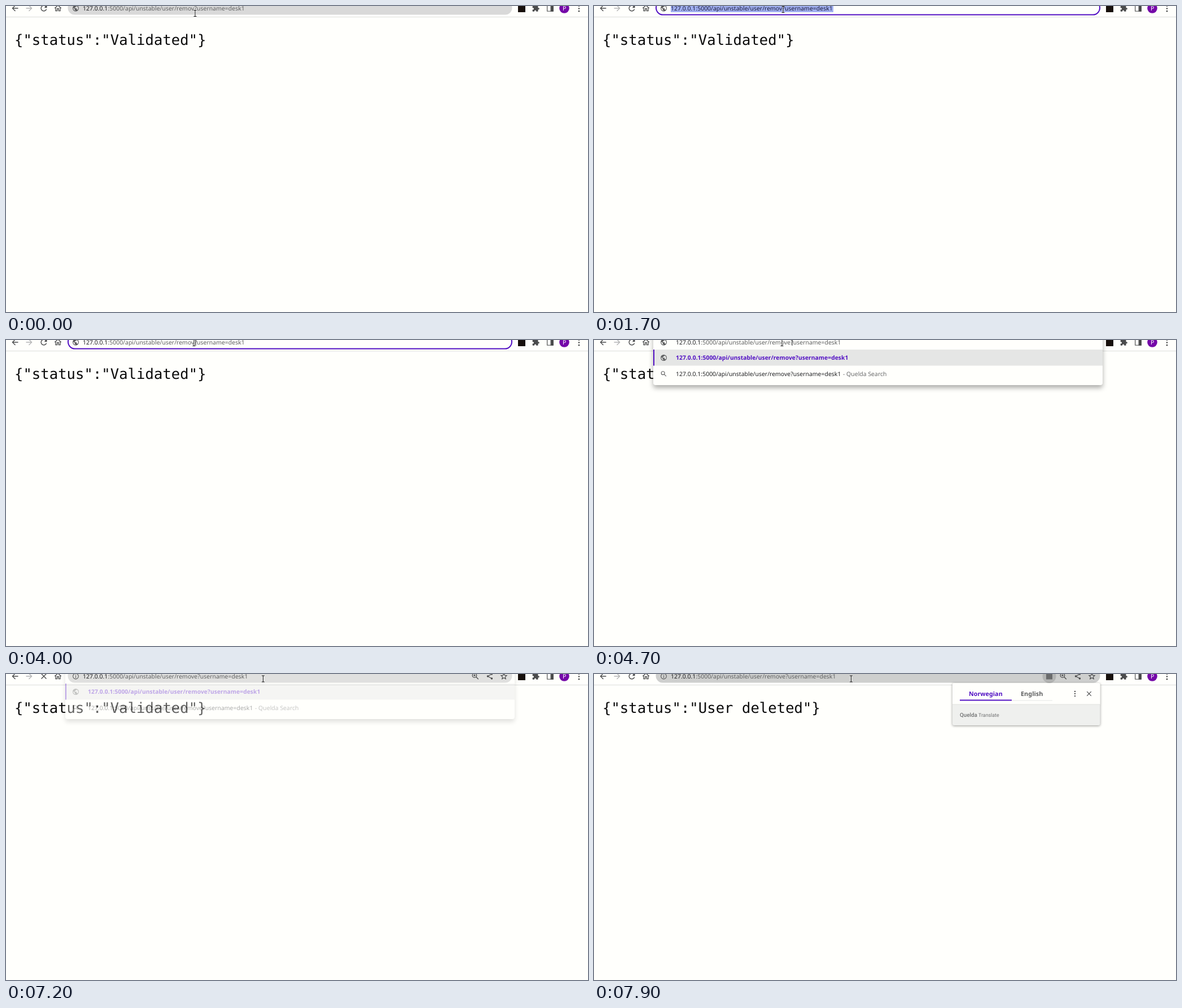
An HTML page that plays this animation: 1031 by 543 pixels, repeating every 8 s.

```html
<!DOCTYPE html>
<html lang="en">
<head>
<meta charset="utf-8">
<title>Removing a user</title>
<style>
  html, body { margin: 0; width: 100%; height: 100%; overflow: hidden; background: #fffffc; }
  svg { display: block; }
  text { white-space: pre; text-rendering: geometricPrecision; font-family: "Noto Sans", "Open Sans", sans-serif; font-size: 10.48px; fill: #5f6061; }
  .host { fill: #202124; }
  .bold { font-weight: 700; font-size: 10.4px; }
  .json { font-family: "DejaVu Sans Mono", monospace; font-size: 25.65px; fill: #0a0a0a; }
  #popup { filter: drop-shadow(0 5px 4px rgba(0, 0, 0, .32)); }
  #bubble { filter: drop-shadow(0 1px 2px rgba(0, 0, 0, .4)); }
</style>
</head>
<body>
<svg id="stage" width="1031" height="543" viewBox="0 0 1031 543"></svg>
<script>
const LOOP = 8000;
const HOST = "127.0.0.1";
const PATH = ":5000/api/unstable/user/";
const QUERY = "?username=desk1";
const PAGE = "#fffffc";
const PURPLE = "#5210c4";
const INK = "#4a4b4c";

const solid = d => `<path d="${d}" fill="currentColor" stroke="none"/>`;
const shapes = {
  back: solid("M20 11H7.800l5.600-5.600L12 4l-8 8 8 8 1.400-1.400L7.800 13H20z"),
  forward: solid("M4 11h12.200l-5.600-5.600L12 4l8 8-8 8-1.400-1.400L16.200 13H4z"),
  reload: solid("M17.650 6.350A8 8 0 1 0 19.730 14h-2.080A6 6 0 1 1 16.220 7.780L13 11h7V4z"),
  cross: '<path d="M5.500 5.500l13 13m0-13l-13 13"/>',
  home: solid("M12 5.700l5 4.500V18h-2v-6H9v6H7v-7.800zM12 3L2 12h3v8h6v-6h2v6h6v-8h3z"),
  globe: solid("M12 2a10 10 0 1 0 0 20 10 10 0 0 0 0-20zm-1 17.930A8 8 0 0 1 4.200 10.200L9 15v1a2 2 0 0 0 2 2zm6.900-2.540A2 2 0 0 0 16 16h-1v-3a1 1 0 0 0-1-1H8v-2h2a1 1 0 0 0 1-1V7h2a2 2 0 0 0 2-2v-.400a8 8 0 0 1 2.900 12.800z"),
  info: '<circle cx="12" cy="12" r="9"/><path d="M12 6.500v2.500M12 11v6.500"/>',
  search: '<circle cx="9.500" cy="9.500" r="5.500"/><path d="M14 14l6 6"/>',
  zoom: '<circle cx="9.500" cy="9.500" r="6"/><path d="M14 14l6.500 6.500M6.500 9.500h6M9.500 6.500v6"/>',
  share: '<path d="M18 5L6 12l12 7"/><g fill="currentColor" stroke="none"><circle cx="18" cy="5" r="3"/><circle cx="6" cy="12" r="3"/><circle cx="18" cy="19" r="3"/></g>',
  star: '<path d="M12 3.500l2.600 5.700 6.200.6-4.700 4.200 1.400 6.100-5.500-3.300-5.500 3.300 1.400-6.100-4.700-4.200 6.200-.6z"/>',
  puzzle: solid("M20.500 11H19V7a2 2 0 0 0-2-2h-4V3.500a2.500 2.500 0 0 0-5 0V5H4a2 2 0 0 0-2 2v3.800h1.500a2.700 2.700 0 0 1 0 5.400H2V20a2 2 0 0 0 2 2h3.800v-1.500a2.700 2.700 0 0 1 5.400 0V22H17a2 2 0 0 0 2-2v-4h1.500a2.500 2.500 0 0 0 0-5z"),
  panel: '<path d="M3 3h18v18H3z"/><path d="M14 3h7v18h-7z" fill="currentColor"/>',
  dots: '<g fill="currentColor" stroke="none"><circle cx="12" cy="5" r="2"/><circle cx="12" cy="12" r="2"/><circle cx="12" cy="19" r="2"/></g>'
};

function icon(name, x, y, size = 16, color = INK, id = "") {
  return `<g id="${id}" transform="translate(${x - size / 2} ${y - size / 2}) scale(${size / 24})"
    fill="none" stroke="${color}" color="${color}" stroke-width="2">${shapes[name]}</g>`;
}

const rect = (x, y, w, h, fill, extra = "") =>
  `<rect x="${x}" y="${y}" width="${w}" height="${h}" fill="${fill}" ${extra}/>`;
const url = word => `<tspan class="host">${HOST}</tspan>${PATH}${word}${QUERY}`;

const stage = document.getElementById("stage");
stage.innerHTML = `
  ${rect(0, 0, 1031, 543, PAGE)}
  ${rect(0, 19, 1031, 1, "#dcdddc")}
  ${icon("back", 16, 4, 16.5)}
  ${icon("forward", 41, 4, 16.5, "#b4b5b5")}
  ${icon("reload", 67, 4, 16.5, INK, "reload")}
  ${icon("cross", 67, 4, 16.5, INK, "stop")}
  ${icon("home", 92, 4, 16)}
  ${rect(907, -2, 13, 13, "#17100c")}
  ${icon("puzzle", 938.5, 4, 14)}
  ${icon("panel", 964, 4, 14)}
  <circle cx="989" cy="4" r="8.800" fill="#7408a8"/>
  <text x="986" y="8" style="fill:#fff">P</text>
  ${icon("dots", 1015, 4.5, 16)}
  <text id="status" class="json" x="15" y="69.300"></text>

  ${rect(109.5, -9, 787, 24.5, "#d9d9d9", 'id="pill" rx="12.2"')}
  ${rect(110, -9, 786, 24.5, PAGE, `id="ring" rx="12.2" stroke="${PURPLE}" stroke-width="2"`)}
  ${rect(136, -3, 288, 14, "#a0aff0", 'id="selection"')}

  <g id="popup">
    ${rect(105, -20, 796, 100, PAGE, 'rx="4"')}
    ${rect(105, 17, 796, 28.5, "#e5e6e5")}
    ${rect(105, 17, 2, 28.5, PURPLE)}
    ${icon("globe", 123.5, 31.5, 13.2, "#606162")}
    <text class="bold" x="145" y="35" style="fill:${PURPLE}">${HOST}${PATH}remove${QUERY}</text>
    ${icon("search", 123.5, 60, 13, "#606162")}
    <text x="145" y="63.500"><tspan class="host">${HOST}${PATH}remove${QUERY}</tspan></text>
    <text x="441" y="63.500" style="fill:#6a6b6c">- Quelda Search</text>
  </g>

  ${icon("globe", 123.5, 4, 13.2, "#58595a", "site")}
  ${icon("info", 123.5, 4, 13, "#58595a", "about")}
  <text id="address" y="8"></text>
  ${rect(0, -2, 1, 12, "#202124", 'id="caret"')}
  <g id="translate">
    <circle cx="806.500" cy="4" r="12" fill="#b3b4b3"/>
    ${rect(801, -1.5, 11, 11, "#6b6c6d")}
  </g>
  <g id="actions">
    ${icon("zoom", 831.5, 4, 15)}
    ${icon("share", 857, 4, 14)}
    ${icon("star", 882, 4, 14)}
  </g>

  <g id="bubble">
    ${rect(635, 16, 261.5, 75, "#eff0ee", 'rx="3"')}
    <path d="M635 54V19q0-3 3-3h255.500q3 0 3 3v35z" fill="${PAGE}"/>
    ${rect(635, 53.5, 261.5, 1, "#e0e1e0")}
    <text class="bold" x="664" y="38.500" style="fill:${PURPLE};font-size:10.8px">Norwegian</text>
    <text class="bold" x="756" y="38.500" style="font-size:10.9px">English</text>
    ${rect(740, 46.5, 72, 1, "#e6e7e8")}
    ${rect(648, 45.5, 92, 2, PURPLE)}
    ${icon("dots", 852, 35, 14)}
    ${icon("cross", 877, 35, 14)}
    <text x="648" y="75.500" style="font:500 9.800px Roboto,sans-serif;fill:#707172">Quelda</text>
    <text x="681" y="75.500" style="font:8.900px Roboto,sans-serif;fill:#707172">Translate</text>
  </g>

  <g id="beam" fill="none">
    <path d="M-2.500-5.500H2.500M-2.500 5.500H2.500M0-5.500V5.500" stroke="#fff" stroke-width="2.500" opacity=".6"/>
    <path d="M-2.500-5.500H2.500M-2.500 5.500H2.500M0-5.500V5.500" stroke="#111"/>
  </g>
  <path id="arrow" d="M0 0V12.500L2.900 9.900 5 14.700 7 13.800 4.900 9.200H8.800Z" fill="#0a0a0a" stroke="#fff" stroke-width=".8"/>`;

const el = {};
stage.querySelectorAll("[id]").forEach(node => { if (node.id) el[node.id] = node; });
const show = (node, on) => { node.style.display = on ? "" : "none"; };

// Pointer rests: time, x, y
const rests = [
  [0, 335, 13], [400, 343, 9], [500, 336, 7], [1100, 335, 6],
  [1800, 336, 10], [1900, 338, 26], [2000, 340, 44], [2100, 341, 53],
  [2200, 341, 43], [2300, 340, 27], [2400, 338, 13],
  [2600, 335, 8], [2700, 337, 9], [2900, 335, 5], [3000, 333, 2], [4000, 333, 5]
];

function pointerAt(t) {
  if (t >= 5400) {
    const p = Math.min(1, (Math.floor(t / 100) - 53) / 6);
    const ease = p * p * (3 - 2 * p);
    return [333 + 122.5 * ease, 5 + 3.5 * ease];
  }
  return rests.filter(r => r[0] <= t).pop().slice(1);
}

function caretAt(t) {
  if (t >= 1500 && t < 1700) return 335;
  if (t >= 4000 && t < 4700) return 335.5;
  if (t >= 4700 && t < 5200 || t >= 5700 && t < 6200) return 350.5;
  if (t >= 6200 && t < 6700) return 439;
  return null;
}

let addressKey = "";
function setAddress(x, word, selected) {
  const key = x + word + selected;
  if (key === addressKey) return;
  addressKey = key;
  el.address.setAttribute("x", x);
  el.address.innerHTML = selected
    ? `<tspan style="fill:#1b1b3a">${HOST}${PATH}${word}${QUERY}</tspan>` : url(word);
}

function render(t) {
  const focused = t >= 1500 && t < 7200;
  const selected = t >= 1700 && t < 4000;
  const editing = t >= 4700 && t < 7200;
  const sent = t >= 7200;
  const loaded = t >= 7600;

  show(el.ring, focused);
  show(el.selection, selected);
  el.pill.setAttribute("fill", sent ? "#cecfce" : "#d9d9d9");
  setAddress(editing ? 145 : 136, t < 4700 ? "remov" : "remove", selected);

  const fade = editing ? 1 : t >= 7200 && t < 7300 ? .37 : t >= 7300 && t < 7400 ? .1 : 0;
  show(el.popup, fade > 0);
  el.popup.style.opacity = fade;

  show(el.site, !sent);
  show(el.about, sent);
  show(el.actions, sent);
  show(el.stop, sent && !loaded);
  show(el.reload, !sent || loaded);
  el.status.textContent = `{"status":"${loaded ? "User deleted" : "Validated"}"}`;

  show(el.translate, t >= 7700);
  show(el.bubble, t >= 7800);
  el.bubble.style.opacity = t >= 7900 ? 1 : .5;

  const caret = caretAt(t);
  show(el.caret, caret !== null);
  if (caret !== null) el.caret.setAttribute("x", caret);

  const [x, y] = pointerAt(t);
  const isArrow = t >= 1900 && t < 4000;
  show(el.arrow, isArrow);
  show(el.beam, !isArrow);
  (isArrow ? el.arrow : el.beam).setAttribute("transform", `translate(${x} ${y})`);
}

const start = performance.now();
function tick() {
  render((performance.now() - start) % LOOP);
  requestAnimationFrame(tick);
}
tick();
</script>
</body>
</html>
```
